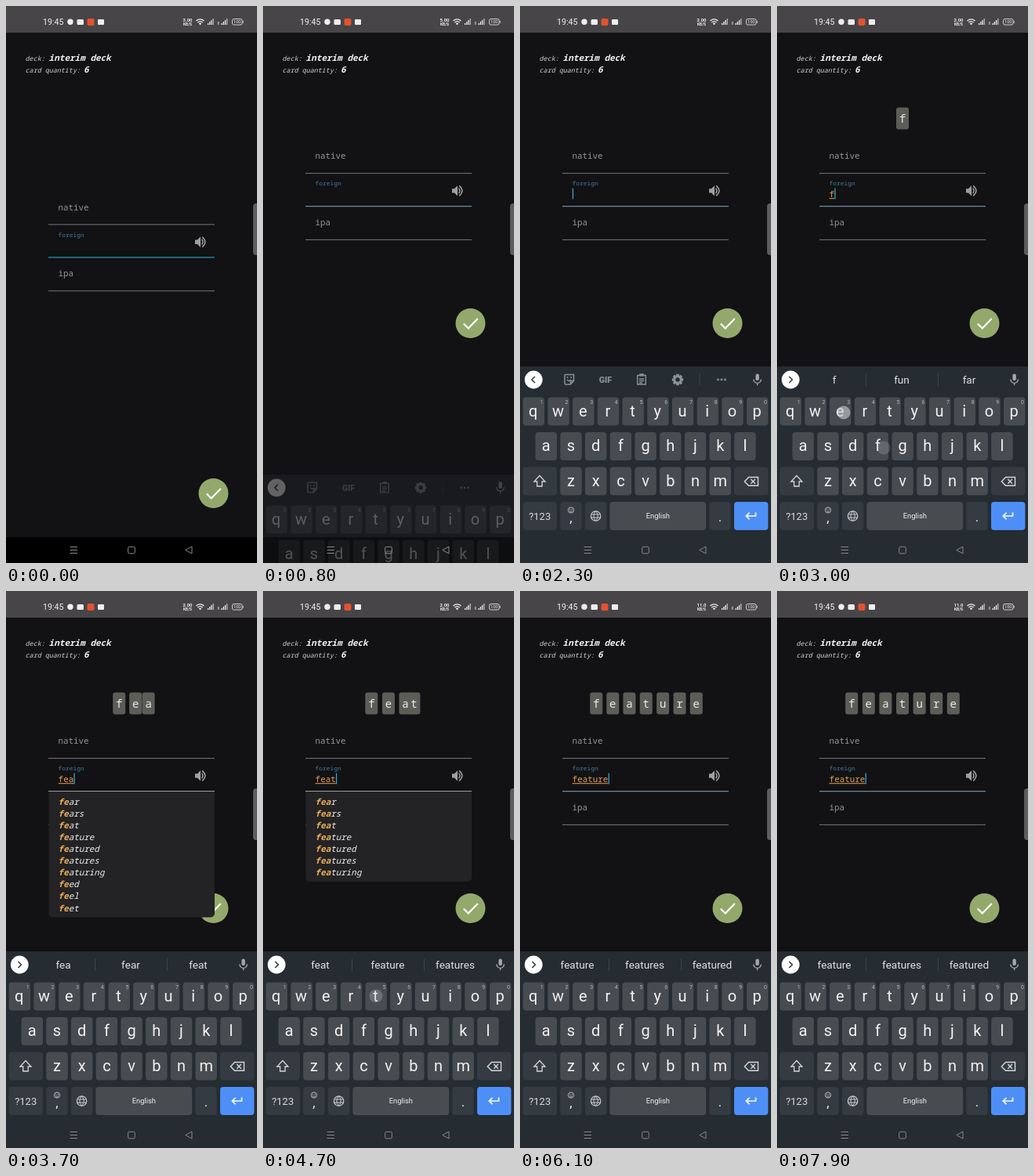
An HTML page that plays this animation: 320x711 px, repeating every 8000 ms.

```html
<!DOCTYPE html>
<html lang="en">
<head>
<meta charset="utf-8">
<title>Card editor</title>
<style>
html, body { margin: 0; width: 100%; height: 100%; overflow: hidden; background: #121114; }
svg { display: block; width: 100%; height: 100%; }
text { white-space: pre; }
.m { font-family: "Noto Sans Mono", "DejaVu Sans Mono", monospace; }
.r { font-family: Roboto, sans-serif; }
.i { font-style: italic; }
.b { font-weight: 600; }
.c { text-anchor: middle; }
</style>
</head>
<body>
<svg id="stage" viewBox="0 0 320 711"></svg>
<script>
const LOOP = 8000;
const stage = document.getElementById('stage');

const rect = (x, y, w, h, fill, r = 0, extra = '') =>
  `<rect x="${x}" y="${y}" width="${w}" height="${h}" rx="${r}" fill="${fill}" ${extra}/>`;
const text = (x, y, size, fill, s, cls = 'm', extra = '') =>
  `<text x="${x}" y="${y}" font-size="${size}" fill="${fill}" class="${cls}" ${extra}>${s}</text>`;
const path = (d, color, w = 1, extra = '') =>
  `<path d="${d}" fill="none" stroke="${color}" stroke-width="${w}" ${extra}/>`;
const shape = (d, fill) => `<path d="${d}" fill="${fill}"/>`;
const circle = (x, y, r, fill, extra = '') =>
  `<circle cx="${x}" cy="${y}" r="${r}" fill="${fill}" ${extra}/>`;
const group = (id, s, extra = '') => `<g id="${id}" ${extra}>${s}</g>`;

// Typing: time at which the field takes each letter
const WORD = 'feature';
const TYPED = [2800, 3200, 3600, 4700, 4900, 5400, 5900];
const HINTS = ['f fun far', 'fe feel few', 'fea fear feat', 'feat feature features',
  'feature features featured', 'feature features featured', 'feature features featured'];
// Time, matched prefix, words
const LISTS = [
  [3700, 2, 'fear fears feat feature featured features featuring feed feel feet'],
  [4000, 3, 'fear fears feat feature featured features featuring'],
  [5000, 4, 'feat feature featured features featuring'],
  [5400, 6, 'feature featured features'],
  [5800, 0, '']
];
const TOUCHES = [[2800, 136, 564], [2950, 85, 519], [3330, 31, 565], [4520, 144, 517],
  [4770, 208, 519], [4880, 113, 519], [4960, 82, 519]];

function statusBar() {
  const signal = x => [0, 1, 2, 3].map(i =>
    rect(x + i * 2.2, 22 - i * 2, 1.3, 2 + i * 2, i < 3 ? '#eee' : '#bbb')).join('');
  return rect(0, 0, 320, 34, '#474548') +
    text(47, 24, 10.6, '#f2f2f2', '19:45', 'r') +
    circle(82, 20.3, 3.7, '#eee') + rect(90.5, 17, 8.5, 7, '#eee', 1.5) +
    rect(103.5, 16, 9, 9, '#e4512f', 2) + rect(117, 17, 8, 7, '#eee', 1) +
    text(231.5, 19.6, 6, '#eee', '', 'r b c', 'id="speed"') +
    text(231.5, 25.2, 4.8, '#eee', 'KB/S', 'r b c') +
    path('M242.5 19Q247.5 14.6 252.5 19M244.3 21Q247.5 18.2 250.7 21', '#eee', 1.2) +
    shape('M245.7 22.3Q247.5 20.8 249.3 22.3L247.5 24.3Z', '#eee') +
    signal(257) + signal(274.5) + text(269.5, 24, 4.5, '#ddd', 'R', 'r') +
    rect(288.5, 16.5, 12.5, 7.5, 'none', 2, 'stroke="#ddd" stroke-width=".9"') +
    rect(301.6, 18.8, 1, 3, '#ddd') + text(294.8, 22.3, 5.6, '#eee', '100', 'r c');
}

function form() {
  const speaker = shape('M241 233.2h3l4-4v13.4l-4-4h-3z', '#a09fa2') +
    path('M249.6 232.4Q252.2 235.8 249.6 239.2M250.2 229.4Q257.6 235.8 250.2 242.4', '#a09fa2', 1.5);
  return text(66.4, 195.4, 10.9, '#959497', 'native') +
    text(66.4, 280.2, 10.9, '#959497', 'ipa') +
    text(66.6, 229.4, 7.9, '#437e99', 'foreign') + speaker +
    path('M54 213.6H266M54 298.4H266', '#777679') +
    path('M54 255.6H266', '#6a8ca0', 1.4, 'id="focus"') +
    text(66.6, 243.6, 10.9, '#e0a052', '', 'm', 'id="typed"') +
    rect(66.6, 245.2, 0, 1, '#e0a052', 0, 'id="under"') +
    rect(67, 232.5, 1.3, 14, '#3ba2cf', 0, 'id="cursor"');
}

function keyboard() {
  const KEY = '#474c51', DARK = '#343b42', INK = '#f1f2f3', ICON = '#8a9198';
  const row = (letters, x, y, digits) => [...letters].map((ch, i) => {
    const cx = x + i * 31.7;
    return rect(cx - 13.7, y, 27.4, 36, KEY, 4) +
      text(cx - (digits ? .6 : 0), y + 24.4, 20, INK, ch, 'r c') +
      (digits ? text(cx + 10.3, y + 8.2, 7, '#b4b8bb', (i + 1) % 10, 'r c') : '');
  }).join('');

  const teeth = [...Array(8)].map((_, i) =>
    rect(199.2, 469.8, 3.6, 4, ICON, .6, `transform="rotate(${i * 45} 201 477)"`)).join('');
  const tools = path('M19 473l-4 4 4 4', '#30373d', 1.5) +
    path('M58 470.5h10.5v8l-4 4.500H58a1 1 0 0 1-1-1v-10.500a1 1 0 0 1 1-1zM68.500 478.500h-4v4M60 477q2.500 3 5 0', ICON, 1.5) +
    circle(60.5, 474, 1, ICON) + circle(65, 474, 1, ICON) +
    text(109, 480.8, 10.8, ICON, 'GIF', 'r c', 'font-weight="800"') +
    path('M149.700 471.500h10.600v11.500h-10.600zM152 476h6M152 478.500h6M152 481h4', ICON, 1.4) +
    rect(152, 469.3, 6, 3.2, ICON, 1) +
    teeth + path('M205.300 477a4.300 4.300 0 1 1-8.600 0a4.300 4.300 0 1 1 8.600 0', ICON, 3) +
    path('M229 469v16', '#3c444b') +
    [252.5, 257, 261.5].map(x => circle(x, 477, 1.4, ICON)).join('');
  const hints = path('M15.5 473l4 4-4 4', '#30373d', 1.5) +
    path('M113.500 469v16M205.500 469v16', '#3c444b') +
    [73, 159, 245].map(x => text(x, 482.2, 13.6, '#dfe2e4', '', 'r c hint')).join('');
  const mic = rect(300.4, 469.5, 4.4, 8.6, '#a2a8ae', 2.2) +
    path('M297.800 476.500a4.800 4.800 0 0 0 9.600 0M302.600 481.300v3', '#a2a8ae', 1.3);

  return rect(0, 460, 320, 251, '#252c32') + circle(17.3, 477, 11.4, '#fff') +
    group('tools', tools) + group('hints', hints) + mic +
    row('qwertyuiop', 17.4, 499.6, true) + row('asdfghjkl', 33.3, 544, false) +
    row('zxcvbnm', 65, 588.4, false) +
    rect(3.6, 588.4, 43.4, 36, DARK, 4) + rect(273, 588.4, 43.4, 36, DARK, 4) +
    path('M25 599.500l-7 7.500h3.800v6h6.400v-6h3.800z', '#d4d7d9', 1.3) +
    path('M291.500 601.500h12v10.800h-12l-5.200-5.400zM294.300 604l5.600 5.800M299.900 604l-5.600 5.800', '#d4d7d9', 1.4) +
    rect(3.6, 633, 43.4, 36, DARK, 4) + text(25.2, 656.4, 13, '#d9dcde', '?123', 'r c') +
    rect(51.3, 633, 27.4, 36, DARK, 4) + text(65, 659, 17, INK, ',', 'r c') +
    circle(65, 643.5, 3.6, 'none', 'stroke="#c9cccf" stroke-width=".9"') +
    circle(63.7, 642.7, .6, '#c9cccf') + circle(66.3, 642.7, .6, '#c9cccf') +
    path('M63.200 644.500q1.800 2 3.600 0', '#c9cccf', .8) +
    rect(83, 633, 27.4, 36, DARK, 4) +
    circle(96.6, 651, 6.2, 'none', 'stroke="#c9cccf" stroke-width="1.2"') +
    path('M90.800 649h11.600M90.800 653h11.600M96.600 644.800q-5.400 6.200 0 12.400q5.400-6.200 0-12.400', '#c9cccf', 1) +
    rect(114.4, 633, 122.8, 36, KEY, 4) + text(175.8, 654.4, 9.4, INK, 'English', 'r c') +
    rect(241.2, 633, 27.4, 36, DARK, 4) + text(255, 658, 17, INK, '.', 'r c') +
    rect(273, 633, 43.4, 36, '#4e8ff7', 4) +
    path('M300.500 646.500v4.500H288.500M292.500 646.800l-4.200 4.200 4.200 4.200', '#fff', 1.6);
}

const nav = path('M81.600 690.500h9.400M81.600 694.500h9.400M81.600 698.500h9.400', '#85898c') +
  rect(155.7, 690.3, 8.6, 8.6, 'none', 1.6, 'stroke="#85898c"') +
  path('M237 690v9l-8.200-4.500z', '#85898c', 1, 'stroke-linejoin="round"');

stage.innerHTML = rect(0, 0, 320, 711, '#121114') + statusBar() +
  text(24.6, 70, 8.4, '#d2d2d2', 'deck:', 'm i') +
  text(54.6, 70, 11, '#f4f4f4', 'interim deck', 'm i b') +
  text(24.6, 85.3, 8.4, '#d2d2d2', 'card quantity:', 'm i') +
  text(99, 85.3, 11, '#f4f4f4', '6', 'm i b') +
  rect(315, 252, 9, 66, '#5d5c5f', 4) +
  group('tiles', '') + group('form', form()) +
  group('done', circle(264.5, 405, 19, '#93a96b') +
    path('M255.800 405.500l6 6 12-12.500', '#fff', 2.2)) +
  group('list', '') +
  rect(0, 678, 320, 33, '#000') + group('keys', keyboard()) + nav +
  TOUCHES.map(([, x, y]) => circle(x, y, 8.5, '#c9ced3', 'class="touch" opacity="0"')).join('');

const el = {};
for (const node of stage.querySelectorAll('[id]')) el[node.id] = node;
const hintText = stage.querySelectorAll('.hint');
const dots = stage.querySelectorAll('.touch');
const clamp = v => Math.max(0, Math.min(1, v));
const set = (node, name, value) => node.setAttribute(name, value);
const show = (node, on) => set(node, 'display', on ? 'inline' : 'none');

function tiles(n, t) {
  const p = n ? clamp((t - TYPED[n - 1]) / 300) : 1;
  let boxes = '', letters = '';
  for (let i = 0; i < n; i++) {
    const slide = i < n - 1 ? 10.8 * (1 - p) ** (1.5 + i * .3) : 0;
    const x = 160 + (i - (n - 1) / 2) * 21.6 + slide;
    boxes += rect(x - 8, 129.5, 16, 28, '#5d5d57', 3);
    letters += text(x, 148.8, 14, '#ececea', WORD[i], 'm c');
  }
  return boxes + letters;
}

function list(t) {
  const entry = LISTS.filter(l => l[0] <= t).pop();
  if (!entry || !entry[2]) return '';
  const [, hit, words] = entry;
  const rows = words.split(' ');
  return rect(54.5, 256.4, 211.5, rows.length * 15.1 + 9, '#232225', 5) +
    rect(54.5, 256.4, 211.5, 8, '#232225') +
    rows.map((w, i) => text(66.6, 272.6 + i * 15.1, 10.9, '#f0f0f0',
      `<tspan fill="#eeb059" font-weight="600">${w.slice(0, hit)}</tspan>${w.slice(hit)}`, 'm i')).join('');
}

function cursorOn(t, n) {
  if (!n) return t >= 300 && Math.floor((t - 300) / 500) % 2 === 0;
  return Math.floor((t - TYPED[n - 1]) / 500) % 2 === 0;
}

function draw(t) {
  const n = TYPED.filter(s => s <= t).length;
  const raised = t >= 700;
  const rise = clamp((t - 700) / 300);
  const end = 66.6 + n * 6.54;

  el.speed.textContent = t < 200 ? '3.00' : t < 2000 ? '5.00' : t < 5000 ? '2.00' : '11.0';
  set(el.form, 'transform', `translate(0 ${raised ? 0 : 65.3})`);
  set(el.done, 'transform', `translate(0 ${raised ? 0 : 217})`);
  set(el.keys, 'transform', `translate(0 ${251 * (1 - rise) ** 1.46})`);
  set(el.keys, 'opacity', rise);

  el.list.innerHTML = list(t);
  set(el.focus, 'stroke', !raised ? '#2795b5' : el.list.firstChild ? '#99989b' : '#6a8ca0');
  el.tiles.innerHTML = tiles(n, t);
  el.typed.textContent = WORD.slice(0, n);
  set(el.under, 'width', end - 66.6);
  set(el.cursor, 'x', end + .2);
  show(el.cursor, cursorOn(t, n));

  show(el.tools, !n);
  show(el.hints, n);
  if (n) HINTS[n - 1].split(' ').forEach((w, i) => { hintText[i].textContent = w; });

  TOUCHES.forEach(([start], i) => {
    const age = t - start;
    set(dots[i], 'opacity', age < 0 ? 0 : .6 * clamp(1 - (age - 60) / 220));
  });
}

const begin = performance.now();
function tick() {
  draw((performance.now() - begin) % LOOP);
  requestAnimationFrame(tick);
}
draw(0);
requestAnimationFrame(tick);
</script>
</body>
</html>
```
